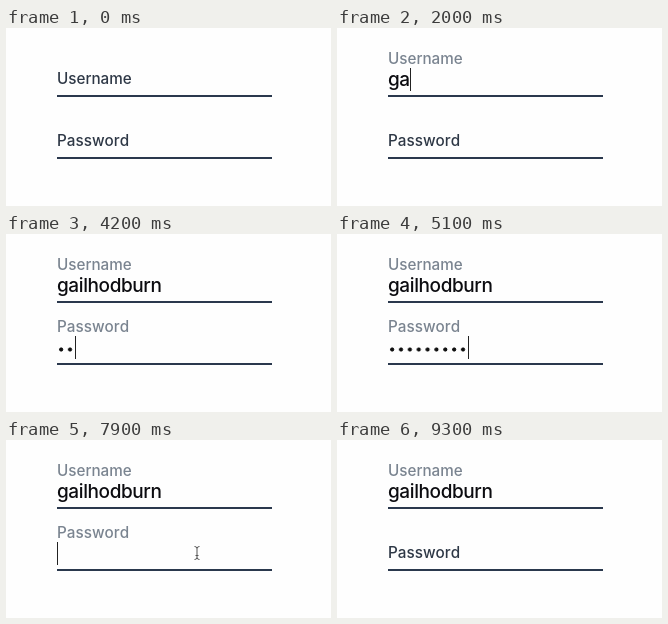
These frames come from a looping animation (325x178 px, 9.8 s). An HTML page:

```html
<!DOCTYPE html>
<html lang="en">
<head>
<meta charset="utf-8">
<title>Wave labels</title>
<style>
  html, body { margin: 0; width: 100%; height: 100%; overflow: hidden; background: #fefefe; }
  .field { position: absolute; left: 51px; width: 215px; height: 40px; border-bottom: 2px solid #2a384d; }
  .field > * { position: absolute; }
  label { left: 0; top: 14px; font: 450 15.25px/20px Inter, sans-serif; white-space: nowrap; }
  label span { display: inline-block; }
  .value { left: 0; top: 13px; font: 450 19px/24px Inter, sans-serif; letter-spacing: -.4px; color: #0c0c10; white-space: pre; }
  .dots { left: 0; top: 18px; height: 16px; background: radial-gradient(circle at 4.2px 8.5px, #111 1.7px, transparent 2.4px) 0 0 / 8.86px 16px; }
  .caret { top: 13px; width: 1px; height: 23px; background: #222; }
  svg { position: absolute; left: 0; top: 0; overflow: visible; }
</style>
</head>
<body>
<div class="field" style="top:27px"><label>Username</label><div class="value"></div><div class="caret"></div></div>
<div class="field" style="top:89px"><label>Password</label><div class="dots"></div><div class="caret"></div></div>
<svg width="1" height="1">
  <path id="arrow" d="M0 0V11.5L2.7 9.1L4.5 13.6L6.5 12.7L4.6 8.4H8Z" fill="#222" stroke="#fff" stroke-width=".6"/>
  <path id="beam" d="M-2.5 -6.5Q0 -6.5 0 -4.5Q0 -6.5 2.5 -6.5M0 -4.5V4.5M-2.5 6.5Q0 6.5 0 4.5Q0 6.5 2.5 6.5M-1.5 2.5H1.5" fill="none" stroke="#555"/>
</svg>
<script>
const LOOP = 9800, STEP = 100, RISE = 20, STAGGER = 50, DURATION = 300;
const DARK = [46, 56, 70], MUTED = [122, 132, 144];
const NAME = "gailhodburn", DOT = 8.86;

// Keystroke times, one per character
const nameKeys = [1900, 2000, 2100, 2200, 2300, 2400, 2400, 2600, 2700, 2800, 3000];
const passKeys = [4000, 4200, 4300, 4300, 4400, 4400, 4600, 4800, 5100];
const CLEAR = 7900;

const nameCaret = [[700, 1400], [1900, 3200]];
const passCaret = [[3200, 3700], [4000, 5600], [6100, 6700], [7300, 8400]];

// Pointer trips: waypoints of [time, x, y]
const trips = [
  [[300, 255, 150], [700, 131, 57], [1200, 131, 57]],
  [[5600, 236, 177], [6300, 205, 150], [7200, 205, 150], [7500, 191, 113], [8100, 191, 113], [8500, 246, 147], [9100, 246, 147], [9300, 246, 180]]
];

const [user, pass] = [...document.querySelectorAll(".field")].map(field => {
  const label = field.querySelector("label");
  const letters = [...label.textContent].map(char => {
    const span = document.createElement("span");
    span.textContent = char;
    return span;
  });
  label.replaceChildren(...letters);
  return { letters, value: field.children[1], caret: field.children[2] };
});
const arrow = document.getElementById("arrow");
const beam = document.getElementById("beam");

const clamp = v => Math.min(1, Math.max(0, v));
const count = (keys, t) => keys.filter(k => k <= t).length;
const within = (spans, t) => spans.some(([from, to]) => t >= from && t < to);
const show = (el, on) => { el.style.visibility = on ? "visible" : "hidden"; };

// cubic-bezier(0.68, -0.55, 0.265, 1.55)
function backEase(x) {
  if (x <= 0 || x >= 1) return clamp(x);
  const curve = (u, a, b) => 3 * (1 - u) ** 2 * u * a + 3 * (1 - u) * u * u * b + u ** 3;
  let lo = 0, hi = 1;
  for (let i = 0; i < 24; i++) {
    const mid = (lo + hi) / 2;
    if (curve(mid, 0.68, 0.265) < x) lo = mid; else hi = mid;
  }
  return curve(lo, -0.55, 1.55);
}

function wave(letters, t, up, down = Infinity) {
  letters.forEach((span, i) => {
    const progress = start => backEase((t - start - i * STAGGER) / DURATION);
    const p = progress(up) - progress(down);
    const mix = DARK.map((c, k) => c + (MUTED[k] - c) * clamp(p));
    span.style.transform = p ? `translateY(${-RISE * p}px)` : "none";
    span.style.color = `rgb(${mix})`;
  });
}

function movePointer(t) {
  const trip = trips.find(points => t >= points[0][0] && t < points.at(-1)[0]);
  let overInput = false;
  if (trip) {
    const i = trip.findIndex(point => point[0] > t);
    const [t0, x0, y0] = trip[i - 1], [t1, x1, y1] = trip[i];
    const s = (t - t0) / (t1 - t0), e = s * s * (3 - 2 * s);
    const x = x0 + (x1 - x0) * e, y = y0 + (y1 - y0) * e;
    overInput = x < 266 && ((y > 38 && y < 68) || (y > 100 && y < 130));
    for (const el of [arrow, beam]) el.setAttribute("transform", `translate(${x} ${y})`);
  }
  show(arrow, trip && !overInput);
  show(beam, overInput);
}

function frame(now) {
  const t = Math.floor(now % LOOP / STEP) * STEP;
  wave(user.letters, t, 680);
  wave(pass.letters, t, 3080, 8600);

  user.value.textContent = NAME.slice(0, count(nameKeys, t));
  user.caret.style.left = user.value.getBoundingClientRect().width + "px";
  show(user.caret, within(nameCaret, t));

  const width = t < CLEAR ? count(passKeys, t) * DOT : 0;
  pass.value.style.width = pass.caret.style.left = width + "px";
  show(pass.caret, within(passCaret, t));

  movePointer(t);
  requestAnimationFrame(frame);
}
requestAnimationFrame(frame);
</script>
</body>
</html>
```
